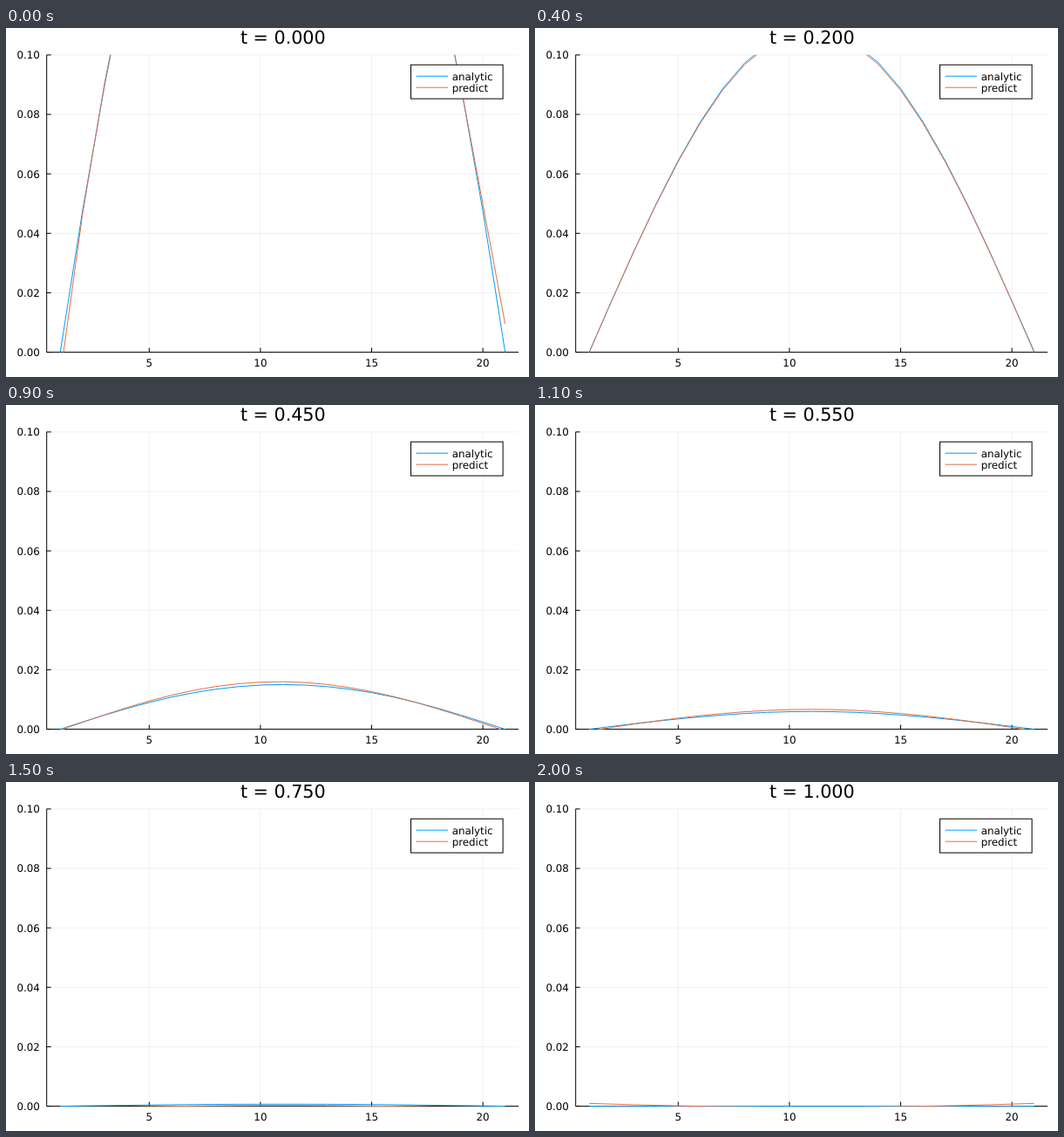
Recreate the animation shown at these times as an HTML page. Size 600 by 400 pixels, loop 2.1 s.

```html
<!DOCTYPE html>
<html>
<head>
<meta charset="utf-8">
<style>
  html, body { margin: 0; width: 100%; height: 100%; overflow: hidden; background: #fff; }
  svg { display: block; }
  text { font: 11.85px "DejaVu Sans", sans-serif; text-rendering: geometricPrecision; }
  #title { font-size: 20.7px; }
  path { fill: none; stroke: #000; stroke-width: 1; }
  #grid { stroke-opacity: .1; stroke-width: .6; }
  .analytic { stroke: #009afa; }
  .predict { stroke: #e36f47; }
</style>
</head>
<body>
<svg width="600" height="400" viewBox="0 0 600 400">
  <clipPath id="plot"><rect x="46.7" y="30.8" width="541.5" height="341.2"/></clipPath>
  <path id="grid"/>
  <path id="axes"/>
  <g id="labels"></g>
  <g clip-path="url(#plot)">
    <path id="analytic" class="analytic"/>
    <path id="predict" class="predict"/>
  </g>
  <rect x="464.5" y="42.2" width="105.6" height="38.9" fill="#fff" stroke="#000"/>
  <path class="analytic" d="M470.5 55.2H507"/>
  <path class="predict" d="M470.5 68.2H507"/>
  <text x="511.7" y="59.5">analytic</text>
  <text x="511.7" y="72.5">predict</text>
  <text id="title" x="317.8" y="18.3" text-anchor="middle"></text>
</svg>
<script>
const { PI, sin, cos, exp, sqrt, sign, abs } = Math;
const el = id => document.getElementById(id);
const px = i => 36.7 + 25.52 * i;
const py = u => 371.6 - 3407 * u;

let grid = '', axes = 'M46.7 30.8V371.6H588', labels = '';
for (let i = 5; i <= 20; i += 5) {
  grid += `M${px(i)} 31V371`;
  axes += `M${px(i)} 371.6v-5`;
  labels += `<text x="${px(i)}" y="387.5" text-anchor="middle">${i}</text>`;
}
for (let k = 0; k <= 5; k++) {
  const u = k / 50, y = py(u);
  grid += `M47 ${y}H588`;
  axes += `M46.7 ${y}h5`;
  labels += `<text x="38.9" y="${y + 4.4}" text-anchor="end">${u.toFixed(2)}</text>`;
}
el('grid').setAttribute('d', grid);
el('axes').setAttribute('d', axes);
el('labels').innerHTML = labels;

// Damped string released at rest from x(1 - x)
function exact(x, t) {
  let u = 0;
  for (let k = 1; k < 60; k += 2) {
    const w = 3 * sqrt((k * PI) ** 2 - 9);
    u += 8 / (k * PI) ** 3 * sin(k * PI * x) * (cos(w * t) + 9 / w * sin(w * t));
  }
  return u * exp(-9 * t);
}

// Prediction error: a swaying bow, a brief ripple and initial edge layers
function error(x, t) {
  const c = 2 * x - 1;
  const edge = 10 * (1 - abs(c));
  const phase = 2 * PI * (t - .31);
  const bow = 8 * sin(phase / .74) - 13 * sin(phase / .95) * c * c;
  const swell = cos(25 * (t - .35)) * exp(-(((t - .35) / .08) ** 2));
  const ripple = (15 * sin(2.6 * c) - 12 * cos(4 * c)) * swell;
  const layer = 88 * sign(c) * exp(-edge - 20 * t) * cos(edge);
  return 1e-4 * (bow + ripple + layer);
}

function drawLine(id, f) {
  const points = Array.from({ length: 21 }, (_, i) => `${px(i + 1)} ${py(f(i / 20)).toFixed(2)}`);
  el(id).setAttribute('d', 'M' + points.join('L'));
}

let shown = -1;
function draw() {
  const step = Math.floor(performance.now() % 2100 / 100);
  if (step !== shown) {
    shown = step;
    const t = step / 20;
    el('title').textContent = 't = ' + t.toFixed(3);
    drawLine('analytic', x => exact(x, t));
    drawLine('predict', x => exact(x, t) + error(x, t));
  }
  requestAnimationFrame(draw);
}
draw();
</script>
</body>
</html>
```
